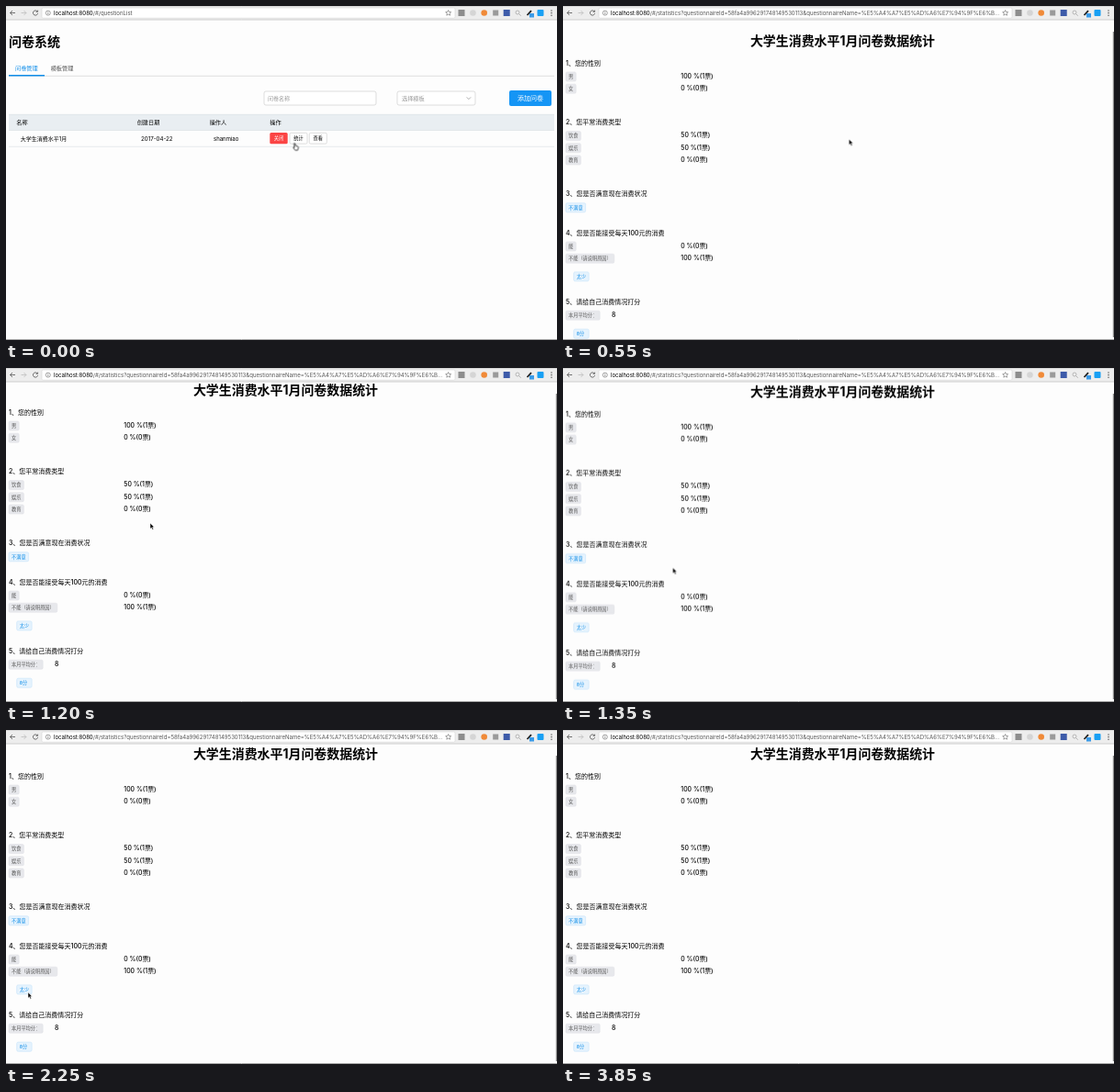
An HTML page for the animation above (3900 ms loop, 600 by 364 pixels).

```html
<!DOCTYPE html>
<html lang="zh-CN">
<head>
<meta charset="utf-8">
<title>问卷系统</title>
<style>
html, body { margin: 0; width: 100%; height: 100%; overflow: hidden; background: #fdfdfd; }
svg { display: block; width: 600px; height: 364px; }
text { font-family: Inter, "Noto Sans CJK SC", "Noto Sans CJK", sans-serif; fill: #000; white-space: pre; }
.bold { font-weight: 700; }
.mid, #scroll text:not(.bold) { font-weight: 500; }
.blue { fill: #108ee9; }
.white { fill: #fff; }
.dim { fill: #555; }
.hint { fill: #999; }
.box { fill: #fff; stroke: #cfcfcf; stroke-width: .7; }
.label { fill: #e7e8ec; stroke: #dcdde2; stroke-width: .5; }
.answer { fill: #e6f3fd; stroke: #c4e2fa; stroke-width: .6; }

#list, #listUrl, #stats, #statsUrl, #tags, #scroll, #status, #thumb, #cursor, #arrow, #hand, #beam {
  animation: 3900ms linear infinite;
}
#list, #listUrl { animation-name: leave; animation-timing-function: step-end; }
#stats, #statsUrl { animation-name: enter; animation-timing-function: step-end; }
#status { animation-name: status; animation-timing-function: step-end; }
#thumb { animation-name: thumb; animation-timing-function: step-end; }
#hand { animation-name: hand; animation-timing-function: step-end; }
#arrow { animation-name: arrow; animation-timing-function: step-end; }
#beam { animation-name: beam; animation-timing-function: step-end; }
#tags { animation-name: tags; }
#scroll { animation-name: scroll; }
#cursor { animation-name: move; }

@keyframes leave { 0% { opacity: 1; } 5.13%, 100% { opacity: 0; } }
@keyframes enter { 0% { opacity: 0; } 5.13%, 100% { opacity: 1; } }
@keyframes status { 0% { opacity: 0; } 1.28% { opacity: 1; } 14.1%, 100% { opacity: 0; } }
@keyframes thumb { 0% { opacity: 0; } 14.1%, 100% { opacity: 1; } }
@keyframes tags { 0%, 8.9% { opacity: 0; } 14.1%, 100% { opacity: 1; } }
@keyframes scroll {
  0%, 14.1% { transform: translateY(0); animation-timing-function: ease-out; }
  20.5%, 28.2% { transform: translateY(-12px); animation-timing-function: ease-out; }
  30.5%, 31.2% { transform: translateY(-14px); animation-timing-function: ease-out; }
  35.9%, 100% { transform: translateY(-12px); }
}
@keyframes move {
  0%, 1.28% { transform: translate(313.5px, 149.5px); }
  6.41%, 12.8% { transform: translate(319px, 144px); animation-timing-function: ease-in-out; }
  21.5%, 31% { transform: translate(157px, 169px); animation-timing-function: ease-in-out; }
  40.9%, 43.6% { transform: translate(24px, 341.5px); }
  55.1%, 57.7% { transform: translate(24px, 286px); animation-timing-function: ease-out; }
  70.5%, 73% { transform: translate(20px, 208px); }
  84.6%, 85.9% { transform: translate(35px, 226px); animation-timing-function: ease-in; }
  92.3%, 100% { transform: translate(300px, 8px); }
}
@keyframes hand { 0% { opacity: 1; } 5.13%, 100% { opacity: 0; } }
@keyframes arrow {
  0% { opacity: 0; } 5.13% { opacity: 1; } 20.5% { opacity: 0; } 29.4% { opacity: 1; }
  69% { opacity: 0; } 85.8% { opacity: 1; } 92.3%, 100% { opacity: 0; }
}
@keyframes beam {
  0% { opacity: 0; } 20.5% { opacity: 1; } 29.4% { opacity: 0; }
  69% { opacity: 1; } 85.8%, 100% { opacity: 0; }
}
</style>
</head>
<body>
<svg viewBox="0 0 600 364">
  <rect width="600" height="364" fill="#fdfdfd"/>

  <g id="list">
    <path d="M3 76.3H597" stroke="#d9d9d9" stroke-width=".8"/>
    <rect x="3" y="75" width="39" height="1.5" class="blue"/>
    <rect x="281" y="93" width="122" height="15" rx="2" class="box"/>
    <rect x="426" y="93" width="85" height="15" rx="2" class="box"/>
    <path d="M501.7 99.4l2.2 2.2 2.2-2.2" fill="none" stroke="#999" stroke-width=".8"/>
    <rect x="548" y="92" width="46" height="17" rx="2" fill="#1595f5"/>
    <rect x="3" y="118" width="594" height="17.5" fill="#e9eef2"/>
    <path d="M3 118.3H597M3 135.5H597M3 153.3H597" stroke="#dde2e6" stroke-width=".7"/>
    <rect x="287.3" y="138" width="19.4" height="12.3" rx="1.5" fill="#fb4444"/>
    <rect x="309" y="138.3" width="19" height="11.8" rx="1.5" class="box"/>
    <rect x="330.3" y="138.3" width="19" height="11.8" rx="1.5" class="box"/>
  </g>

  <g id="stats">
    <g id="scroll"><g id="tags"></g></g>
    <rect id="thumb" x="598.8" y="28" width="1.2" height="333" fill="#8c8c8c"/>
  </g>

  <path d="M0 363.5H600" stroke="#a8a8a8"/>
  <g id="status">
    <path d="M0 360.3H199q1.5 0 1.5 1.5V364H0z" fill="#ececec" stroke="#aaa" stroke-width=".6"/>
  </g>

  <g id="toolbar">
    <rect width="600" height="15" fill="#ededed"/>
    <path d="M0 .4H600" stroke="#d2d2d2" stroke-width=".8"/>
    <path d="M0 15H600" stroke="#c4c4c4" stroke-width=".8"/>
    <rect x="39" y="2" width="450" height="11.2" rx="1.5" fill="#fff" stroke="#d6d6d6" stroke-width=".6"/>
    <g fill="none" stroke="#666" stroke-width=".9">
      <path d="M10 7.5H4.5M7 5l-2.5 2.5L7 10"/>
      <path d="M16.5 7.5H22M19.5 5l2.5 2.5-2.5 2.5" stroke="#c2c2c2"/>
      <path d="M34 5.8A2.6 2.6 0 1 0 34.6 8M34.6 4.6V6.4H32.8"/>
      <circle cx="45.8" cy="7.6" r="2.5" stroke-width=".6"/>
      <path d="M45.8 7.2V9M45.8 5.9V6.5" stroke-width=".7"/>
      <path d="M481.7 4.5l.9 2 2.1.2-1.6 1.4.5 2.1-1.9-1.1-1.9 1.1.5-2.1-1.6-1.4 2.1-.2z" stroke-width=".6"/>
      <circle cx="557" cy="7" r="2" stroke="#aaa" stroke-width=".8"/>
      <path d="M558.5 8.5l2.2 2.2" stroke="#aaa"/>
    </g>
    <rect x="492.5" y="4" width="7" height="7" fill="#8d8d8d"/>
    <circle cx="508.5" cy="7.5" r="3.3" fill="#d5d5d5"/>
    <circle cx="520.7" cy="7.5" r="3.3" fill="#f08a38"/>
    <rect x="530.2" y="4.5" width="6" height="6" fill="#9a9a9a"/>
    <rect x="541.7" y="4" width="7" height="7" fill="#3d5ba9"/>
    <path d="M567.5 10l4.5-4.8" stroke="#222" stroke-width="1.8"/>
    <rect x="570" y="8" width="5" height="4.5" fill="#3b9be8"/>
    <rect x="578.5" y="4" width="7" height="7" rx="1" fill="#18a0f4"/>
    <g fill="#666"><circle cx="594" cy="5" r=".8"/><circle cx="594" cy="7.6" r=".8"/><circle cx="594" cy="10.2" r=".8"/></g>
    <g id="listUrl"></g>
    <g id="statsUrl"></g>
  </g>

  <g id="cursor">
    <path id="arrow" d="M0 0V6.2L1.5 4.9 2.5 7.2 3.6 6.7 2.6 4.5H4.5z" fill="#000" stroke="#fff" stroke-width=".5"/>
    <path id="hand" d="M0 .5Q.8-.3 1.4.6L2.1 3Q4.6 2.9 4.9 4.4L4.6 6.4 4.1 7.7H1.4L-.8 4.9Q-.7 4 .7 4.6z" fill="#fff" stroke="#111" stroke-width=".8"/>
    <path id="beam" d="M-1.6-3.5Q0-3.4 0-2.5 0-3.4 1.6-3.5M0-2.8V2.8M-1.6 3.5Q0 3.4 0 2.5 0 3.4 1.6 3.5" fill="none" stroke="#111" stroke-width=".9"/>
  </g>
</svg>
<script>
const byId = id => document.getElementById(id);

function add(parent, name, attrs) {
  const node = document.createElementNS("http://www.w3.org/2000/svg", name);
  for (const key in attrs) node.setAttribute(key, attrs[key]);
  return parent.appendChild(node);
}

// y is the middle of the line
function write(parent, x, y, size, str, cls = "", anchor = "start") {
  const node = add(parent, "text", { x, y: y + size * .36, "font-size": size, class: cls, "text-anchor": anchor });
  node.textContent = str;
  return node;
}

function tag(x, y, str, kind) {
  const size = 5.2;
  add(byId("tags"), "rect", { x, y: y - 5, width: str.length * size + 6, height: 10, rx: 1.5, class: kind });
  write(byId("tags"), x + 3, y, size, str, kind === "answer" ? "blue" : "dim");
}

function url(id, path) {
  const node = write(byId(id), 52, 7.5, 6.05, "localhost:8080");
  const rest = add(node, "tspan", { class: "dim" });
  rest.textContent = path;
}

const statsPath = "/#/statistics?questionnaireId=58fa4a996291748149530113&quest";
url("listUrl", "/#/questionList");
url("statsUrl", statsPath + "ionnaireName=%E5%A4%A7%E5%AD%A6%E7%94%9F%E6%B...");
write(byId("status"), 2, 363.2, 5.1, "localhost:8080" + statsPath, "dim");

[
  [3, 38.5, 14, "问卷系统", "bold"],
  [10, 67.3, 6.2, "问卷管理", "blue"],
  [48.7, 67.3, 6.2, "模板管理", "dim"],
  [285, 100.6, 6, "问卷名称", "hint"],
  [431, 100.6, 6.2, "选择模板", "hint"],
  [557, 100.6, 7, "添加问卷", "white mid"],
  [11.3, 127.2, 6.2, "名称", "mid"],
  [142.7, 127.2, 6.2, "创建日期", "mid"],
  [221.7, 127.2, 6.2, "操作人", "mid"],
  [287.3, 127.2, 6.2, "操作", "mid"],
  [15.8, 144.4, 6, "大学生消费水平1月"],
  [147, 144.4, 6.2, "2017-04-22"],
  [226, 144.4, 6, "shanmiao"],
  [291.8, 144.2, 5.2, "关闭", "white mid"],
  [313.3, 144.2, 5.2, "统计", "mid"],
  [334.6, 144.2, 5.2, "查看", "mid"]
].forEach(line => write(byId("list"), ...line));

const page = byId("scroll");
write(page, 304.5, 38, 13.95, "大学生消费水平1月问卷数据统计", "bold", "middle");
[
  [62.4, "1、您的性别"],
  [126.9, "2、您平常消费类型"],
  [204.7, "3、您是否满意现在消费状况"],
  [247.2, "4、您是否能接受每天100元的消费"],
  [322.4, "5、请给自己消费情况打分"]
].forEach(([y, str]) => write(page, 3, y, 7, str));

[
  [76.4, "男", "100 %(1票)"],
  [89.6, "女", "0 %(0票)"],
  [141, "饮食", "50 %(1票)"],
  [154.2, "娱乐", "50 %(1票)"],
  [167.4, "教育", "0 %(0票)"],
  [261.4, "能", "0 %(0票)"],
  [274.6, "不能（请说明原因）", "100 %(1票)"]
].forEach(([y, name, votes]) => {
  tag(3, y + .6, name, "label");
  write(page, 128.3, y, 6.9, votes);
});

tag(3, 337.2, "本月平均分：", "label");
write(page, 53, 336.7, 6.9, "8");
tag(3, 219.8, "不满意", "answer");
tag(11.7, 294.9, "太少", "answer");
tag(11.7, 357.2, "8分", "answer");
</script>
</body>
</html>
```
